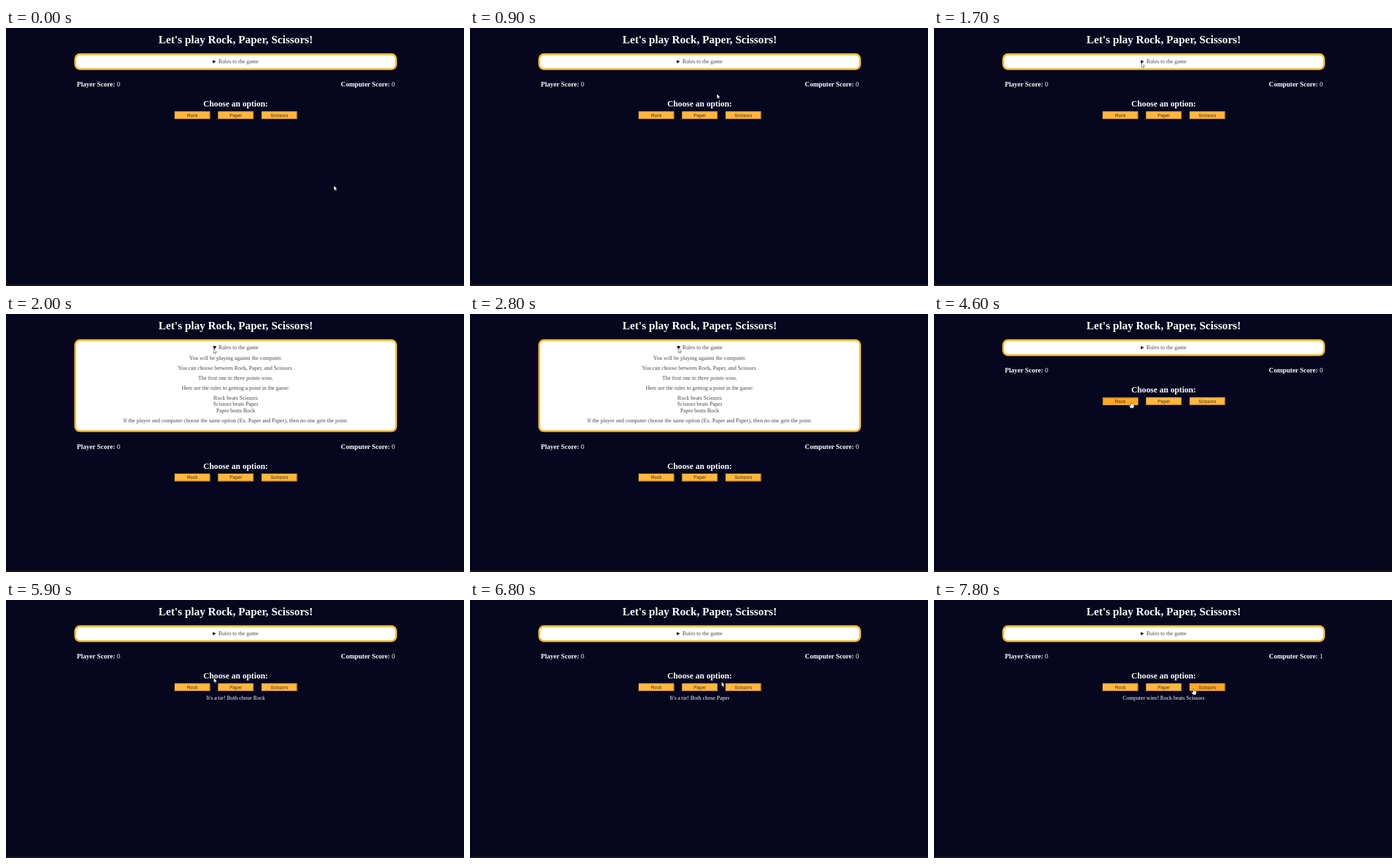
Recreate the animation shown at these times as an HTML page. Size 690 by 388 pixels, loop 8000 ms.

```html
<!DOCTYPE html>
<html lang="en">
<head>
<meta charset="utf-8">
<title>Rock, Paper, Scissors</title>
<style>
  html, body { margin: 0; width: 100%; height: 100%; overflow: hidden; background: #06061f; }
  svg { display: block; width: 690px; height: 388px; }
  text { font: 8.42px "Liberation Serif", "Times New Roman", serif; fill: #fff; text-anchor: middle; }
  .title { font-size: 16.8px; font-weight: bold; }
  .heading { font-size: 12.65px; font-weight: bold; }
  .score { font-size: 10.08px; text-anchor: start; }
  .score tspan { font-weight: bold; }
  .end { text-anchor: end; }
  .panel text { fill: #484848; }
  .button text { font: 7.05px "Liberation Sans", Arial, sans-serif; fill: #44300f; }
</style>
</head>
<body>
<svg viewBox="0 0 690 388">
  <rect y="385.5" width="690" height="3" fill="#19191c"/>
  <text class="title" x="346" y="23.3">Let's play Rock, Paper, Scissors!</text>
  <g class="panel">
    <rect id="box" x="104.3" y="39.4" width="483.4" fill="#fff" stroke="#f6b92c" stroke-width="2.8" rx="7"/>
    <path id="marker"/>
    <text x="350.3" y="53.4">Rules to the game</text>
    <g id="rules"></g>
  </g>
  <g id="game">
    <text class="score" x="106.8" y="88"><tspan>Player Score:</tspan> 0</text>
    <text class="score end" x="586" y="88"><tspan>Computer Score:</tspan> <tspan id="points" style="font-weight:normal">0</tspan></text>
    <text class="heading" x="346" y="118">Choose an option:</text>
    <g id="buttons"></g>
    <text id="result" x="346" y="150"></text>
  </g>
  <g id="cursor" stroke-linejoin="round">
    <path id="arrow" d="M0 0V7.2L1.6 5.7L2.7 8.2L3.8 7.7L2.8 5.3H5Z" fill="#fff" stroke="#222" stroke-width=".5"/>
    <path id="hand" d="M-.8 .7Q0-.5.8.7V3.4L3.6 4Q4.6 4.3 4.4 5.5L3.6 9.5H-.9L-3 6.2Q-3.2 5.1-2.2 5.3L-.8 6.5Z" fill="#fff" stroke="#222" stroke-width=".5"/>
  </g>
</svg>
<script>
const $ = id => document.getElementById(id);
const LOOP = 8000, STEP = 100;

const rules = [
  [68.7, "You will be playing against the computer."],
  [83.5, "You can choose between Rock, Paper, and Scissors."],
  [98.7, "The first one to three points wins."],
  [113.5, "Here are the rules to getting a point in the game:"],
  [128.7, "Rock beats Scissors"],
  [138.3, "Scissors beats Paper"],
  [148, "Paper beats Rock"],
  [162.7, "If the player and computer choose the same option (Ex. Paper and Paper), then no one gets the point."],
];
$("rules").innerHTML = rules.map(([y, s]) => `<text x="346" y="${y}">${s}</text>`).join("");

const buttons = [["Rock", 254], ["Paper", 319.6], ["Scissors", 385]];
$("buttons").innerHTML = buttons.map(([name, x]) => `
  <g class="button" transform="translate(${x} 125.6)">
    <rect width="53.4" height="11.4"/>
    <path d="M0 11.4V0H53.4L52.3 1.1H1.1V10.3Z"/>
    <path d="M53.4 0V11.4H0L1.1 10.3H52.3V1.1Z"/>
    <text x="26.7" y="8.1">${name}</text>
  </g>`).join("");
const buttonParts = [...document.querySelectorAll(".button")].map(g => g.children);

// Cursor stops: time, x, y
const stops = [
  [0, 494, 237], [900, 372, 99], [1700, 312.7, 52], [2600, 312.7, 52], [2800, 313.7, 51],
  [3300, 313.7, 51], [4200, 297, 132], [5600, 297, 132], [5900, 313, 117], [6300, 345, 132],
  [6500, 345, 132], [6800, 379, 123], [7100, 399, 132], [7500, 399, 132], [7800, 391, 133], [LOOP, 391, 133],
];
const clicks = [
  [4600, 0, "It's a tie! Both chose Rock"],
  [6400, 1, "It's a tie! Both chose Paper"],
  [7300, 2, "Computer wins! Rock beats Scissors"],
];

function cursorAt(t) {
  const i = stops.findIndex(s => s[0] > t);
  const [t0, x0, y0] = stops[i - 1], [t1, x1, y1] = stops[i];
  const u = (t - t0) / (t1 - t0), e = u * u * (3 - 2 * u);
  return [x0 + (x1 - x0) * e, y0 + (y1 - y0) * e];
}

function draw(t) {
  const open = t >= 2000 && t < 3000;
  $("box").setAttribute("height", open ? 136.8 : 22.4);
  $("marker").setAttribute("d", open ? "M311.4 48.2H317.2L314.3 53.2Z" : "M311.6 47.9V53.3L316.2 50.6Z");
  $("rules").style.display = open ? "" : "none";
  $("game").setAttribute("transform", `translate(0 ${open ? 114.6 : 0})`);

  const [x, y] = cursorAt(t);
  const inRow = !open && y > 125.6 && y < 137;
  const hovered = buttons.findIndex(b => inRow && x > b[1] && x < b[1] + 53.4);
  const pressed = clicks.find(c => t >= c[0] && t < c[0] + STEP);
  buttonParts.forEach(([face, lit, shade], i) => {
    const edges = ["#f0ad3d", "#b87b1d"];
    if (pressed && pressed[1] === i) edges.reverse();
    face.setAttribute("fill", i === hovered ? "#ffa724" : "#ffb83d");
    lit.setAttribute("fill", edges[0]);
    shade.setAttribute("fill", edges[1]);
  });

  const done = clicks.filter(c => t >= c[0] + STEP);
  $("result").textContent = done.length ? done[done.length - 1][2] : "";
  $("points").textContent = done.length === 3 ? 1 : 0;

  $("cursor").setAttribute("transform", `translate(${x} ${y})`);
  $("arrow").style.display = hovered < 0 ? "" : "none";
  $("hand").style.display = hovered < 0 ? "none" : "";
}

const start = performance.now();
(function tick() {
  const t = (performance.now() - start) % LOOP;
  draw(Math.floor(t / STEP) * STEP);
  requestAnimationFrame(tick);
})();
</script>
</body>
</html>
```
